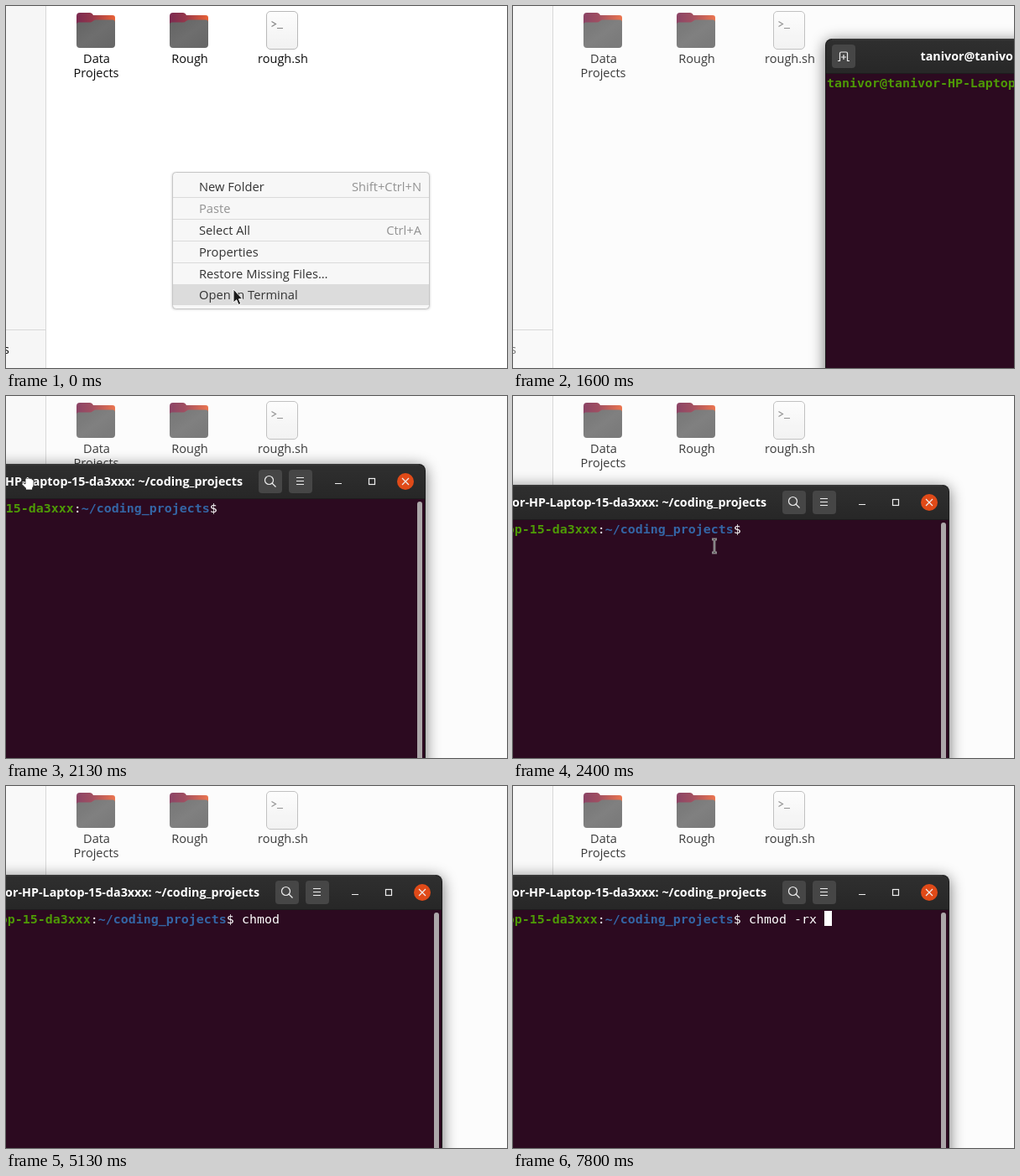
These frames come from a looping animation (597x432 px, 8 s). An HTML page:

```html
<!DOCTYPE html>
<html lang="en">
<head>
<meta charset="utf-8">
<title>Open in terminal</title>
<style>
  html, body { margin: 0; width: 100%; height: 100%; overflow: hidden; background: #fff; }
  svg { display: block; width: 597px; height: 432px; font: 14.5px "Open Sans", "Noto Sans", sans-serif; }
  text { white-space: pre; }
  .mid { text-anchor: middle; }
  .end { text-anchor: end; }
  #files { fill: #0c0c0c; }
  .away #files { fill: #3a3a3a; }
  .away #cut { fill: #777; }
  .away .icon { opacity: .87; }
  #page { fill: #fff; }
  .away #page { fill: #fcfcfc; }
  #side { fill: #f6f6f6; }
  .away #side { fill: #f9f9f9; }
  #menu { fill: #333; font-size: 14.7px; }
  #menu .dim { fill: #929292; }
  .title { font-weight: 700; font-size: 14.3px; fill: #fff; }
  .mono { font: 14.95px "DejaVu Sans Mono", monospace; fill: #fff; }
  .mono .b { font-weight: 700; }
  .btn { fill: #464646; }
  .line { fill: none; stroke: #eee; stroke-width: 1.2; }
  .ptr { stroke-linejoin: round; }
</style>
</head>
<body>
<svg id="stage" viewBox="0 0 597 432">
  <defs>
    <linearGradient id="back"><stop offset="0" stop-color="#7b2a50"/><stop offset=".4" stop-color="#94364b"/><stop offset="1" stop-color="#ea6236"/></linearGradient>
    <linearGradient id="front" x2="1" y2="1"><stop offset="0" stop-color="#636363"/><stop offset=".5" stop-color="#6e6e6e"/><stop offset="1" stop-color="#666"/></linearGradient>
    <linearGradient id="paper" x2="0" y2="1"><stop offset="0" stop-color="#fdfdfd"/><stop offset="1" stop-color="#f1f1f1"/></linearGradient>
    <linearGradient id="bar" x2="0" y2="1"><stop offset="0" stop-color="#2f2f2f"/><stop offset="1" stop-color="#272727"/></linearGradient>
    <filter id="soft" x="-10%" y="-10%" width="120%" height="120%"><feGaussianBlur stdDeviation="9"/></filter>
    <filter id="faint" x="-10%" y="-10%" width="120%" height="120%"><feGaussianBlur stdDeviation="1.5"/></filter>
    <g id="folder" class="icon">
      <path d="M0 14V4Q0 0 4 0H16Q18 0 19 1.500L20 3H43Q46 3 46 6V14H0Z" fill="url(#back)"/>
      <path d="M0 14Q0 11.500 3 11.500H16Q18 11.500 19.500 10L20.500 9.500Q21.500 8.500 23 8.500H43Q46 8.500 46 11.500V38Q46 42 42 42H4Q0 42 0 38Z" fill="url(#front)"/>
    </g>
  </defs>

  <g id="files">
    <rect id="page" width="597" height="432"/>
    <rect id="side" width="47" height="432"/>
    <path d="M47.500 0V432M0 386.500H47" stroke="#d8d8d8"/>
    <text id="cut" class="end" x="4" y="415">s</text>
    <use href="#folder" x="84" y="8"/>
    <use href="#folder" x="195" y="8"/>
    <g class="icon">
      <rect x="310.500" y="6.500" width="37" height="45" rx="4.500" fill="url(#paper)" stroke="#b9b9b9"/>
      <path d="M316.500 18.500L321.500 21.500L316.500 24.500M323 26.500H330" fill="none" stroke="#868686" stroke-width="1.200"/>
    </g>
    <text class="mid" x="108" y="68">Data</text>
    <text class="mid" x="107.500" y="85">Projects</text>
    <text class="mid" x="219" y="68">Rough</text>
    <text class="mid" x="330" y="68">rough.sh</text>
  </g>

  <g id="menu">
    <rect x="198" y="199" width="307" height="163" rx="4" fill="#000" opacity=".22" filter="url(#faint)"/>
    <rect x="198.500" y="198.500" width="306" height="163" rx="4" fill="#f7f7f7" stroke="#c6c6c6"/>
    <rect x="199" y="332" width="305" height="25" fill="#dcdcdc"/>
    <path d="M199 228.500H504M199 254.500H504M199 280.500H504M199 306.500H504" stroke="#dadada"/>
    <text x="230" y="221">New Folder</text>
    <text x="230" y="247" class="dim">Paste</text>
    <text x="230" y="273">Select All</text>
    <text x="230" y="299">Properties</text>
    <text x="230" y="325">Restore Missing Files…</text>
    <text x="230" y="350">Open in Terminal</text>
    <text x="495" y="221" class="dim end">Shift+Ctrl+N</text>
    <text x="495" y="273" class="dim end">Ctrl+A</text>
  </g>

  <g id="term">
    <rect y="3" width="736" height="500" rx="8" opacity=".55" filter="url(#soft)"/>
    <rect width="736" height="500" rx="8" fill="#1d1d1d"/>
    <path d="M1 41V9Q1 1 9 1H727Q735 1 735 9V41Z" fill="url(#bar)"/>
    <path d="M8 .800H728" stroke="#454545"/>
    <rect x="1" y="42" width="734" height="458" fill="#2c0a20"/>
    <rect x="726" y="45" width="6" height="450" rx="3" fill="#aca7a9"/>
    <rect class="btn" x="8" y="7" width="28" height="28" rx="4"/>
    <rect class="btn" x="537" y="7" width="28" height="28" rx="4"/>
    <rect class="btn" x="573" y="7" width="28" height="28" rx="4"/>
    <path class="line" d="M15 26.500H17.500V17.500Q17.500 16 19 16H25Q26.500 16 26.500 17.500V26.500H29M22 19V25M19 22H25"/>
    <circle class="line" cx="549.500" cy="19.500" r="5"/>
    <path class="line" d="M553 23L557.500 27.500M582 16.500H591M582 20.500H591M582 24.500H591M628 23.500H636"/>
    <rect class="line" x="668.500" y="17.500" width="7" height="7"/>
    <circle cx="712" cy="21" r="10" fill="#e04a18"/>
    <path class="line" d="M708 17L716 25M716 17L708 25" stroke-width="1.500"/>
    <text class="title end" x="518" y="26">tanivor@tanivor-HP-Laptop-15-da3xxx: ~/coding_projects</text>
    <text class="mono" x="2" y="58"><tspan class="b" fill="#4e9a06">tanivor@tanivor-HP-Laptop-15-da3xxx</tspan>:<tspan class="b" fill="#3465a4">~/coding_projects</tspan>$</text>
    <text class="mono" id="typed" x="497" y="58"></text>
    <rect id="block" y="43" width="9" height="18" fill="#fff"/>
  </g>

  <path class="ptr" id="arrow" d="M0 0V16L3.700 12.700L6 18.500L8.800 17.300L6.400 11.700H11Z" fill="#1a1a1a" stroke="#fff"/>
  <path class="ptr" id="hand" d="M-3 -1V-5Q-2 -7 -.500 -5.500Q1 -7 2.500 -5.500Q4 -6.500 5 -4.500Q7 -4.500 7 -2.500V2Q7 4 5.500 5.500V8H-2.500V6L-7 1.500Q-7.500 -.500 -5.500 -.500L-3 1Z" fill="#fff" stroke="#222" stroke-width=".8"/>
  <g id="ibeam" fill="none">
    <path d="M-3 -8H3M0 -8V8M-3 8H3" stroke="#fff" stroke-width="2.400"/>
    <path d="M-3 -8H3M0 -8V8M-3 8H3" stroke="#111"/>
  </g>
</svg>
<script>
const LOOP = 8000, STEP = 200 / 3, CHAR = 9, TYPE_X = 497;
const $ = id => document.getElementById(id);

// Each row starts with the step at which it applies.
const drag = [ // window x, y, hand x, y
  [23, 372, 39, 642, 67], [24, 372, 39, 642, 67], [26, -94, 113, 176, 141],
  [28, -190, 104, 78, 130], [32, -236, 81, 26, 104], [35, -221, 105, 44, 131], [36, -216, 106, 49, 130]];
const arrow = [[0, 271, 338], [2, 279, 338], [6, 267, 338], [11, 279, 338], [13, 533, 232], [14, -50, 0]];
const beam = [[36, 240, 179], [41, 249, 179], [43, 262, 179], [45, 274, 179], [47, 281.5, 179]];
const typing = [[0, ''], [55, 'c'], [58, 'ch'], [63, 'chm'], [65, 'chmod'], [72, 'chmod '],
  [101, 'chmod -'], [102, 'chmod -r'], [110, 'chmod -rx'], [117, 'chmod -rx ']];
const blink = [[0, 1], [32, 0], [41, 1], [49, 0], [55, 1], [77, 0], [86, 1]];

const hold = (rows, k) => rows.findLast(r => r[0] <= k) || rows[0];
function glide(rows, k) {
  const a = hold(rows, k), b = rows[rows.indexOf(a) + 1];
  if (!b || k < a[0]) return a;
  const f = (k - a[0]) / (b[0] - a[0]);
  return a.map((v, i) => v + (b[i] - v) * f);
}
const show = (id, on) => $(id).style.display = on ? '' : 'none';
const move = (id, x, y) => $(id).setAttribute('transform', `translate(${Math.round(x * 2) / 2} ${Math.round(y)})`);

function draw(time) {
  const k = Math.floor((time % LOOP + 4) / STEP) % 120;
  const [, x, y, handX, handY] = glide(drag, k);
  const text = hold(typing, k)[1];

  $('stage').classList.toggle('away', k >= 23);
  show('menu', k < 6);
  show('term', k >= 23);
  $('term').style.opacity = k === 23 ? .6 : 1;
  move('term', Math.round(x), y);
  $('typed').textContent = text;
  $('block').setAttribute('x', TYPE_X + text.length * CHAR);
  show('block', hold(blink, k)[1]);

  show('arrow', k < 14);
  move('arrow', ...hold(arrow, k).slice(1));
  show('hand', k >= 24 && k < 36);
  move('hand', handX, handY);
  show('ibeam', k >= 36 && k < 55);
  move('ibeam', ...hold(beam, k).slice(1));
}

let start;
function tick(now) {
  start ??= now;
  draw(now - start);
  requestAnimationFrame(tick);
}
draw(0);
requestAnimationFrame(tick);
</script>
</body>
</html>
```
